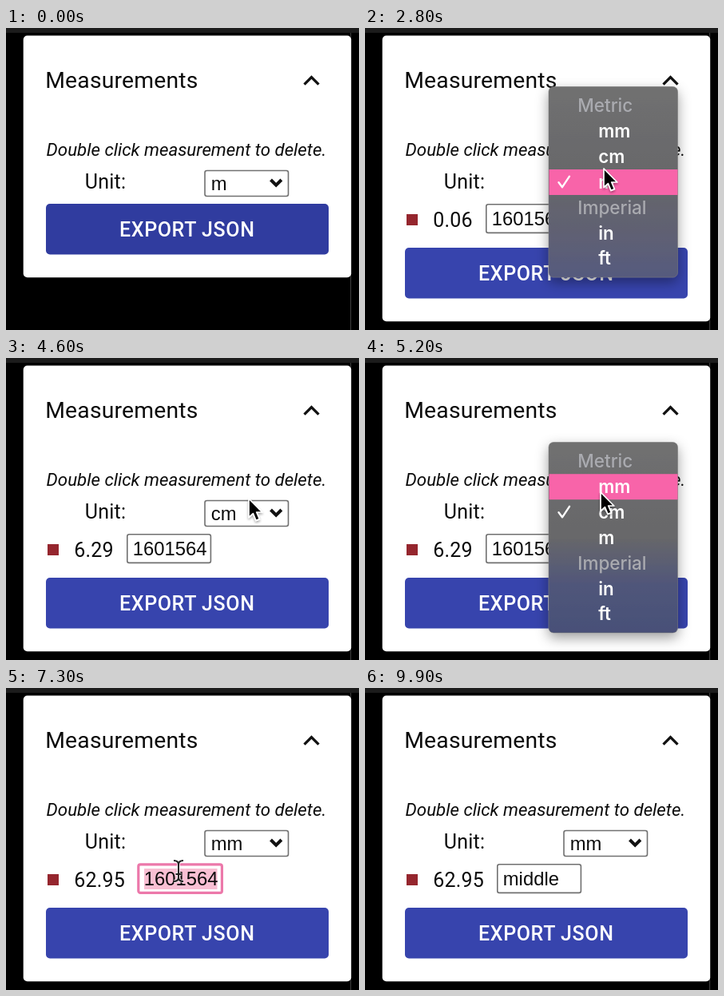
An HTML page for the animation above (10 s loop, 442 by 378 pixels).

```html
<!DOCTYPE html>
<html lang="en">
<head>
<meta charset="utf-8">
<title>Measurements panel</title>
<style>
  html, body { margin: 0; width: 100%; height: 100%; overflow: hidden; background: #000; }
  svg { display: block; width: 442px; height: 378px; }
  text { font-family: Roboto, sans-serif; fill: #0b0b0b; white-space: pre; }
  .title { font-size: 28.3px; letter-spacing: .2px; }
  .hint { font-size: 22.3px; font-style: italic; }
  .body { font-size: 25px; letter-spacing: .22px; }
  .field { font-family: "Liberation Sans", Arial, sans-serif; font-size: 23.8px; }
  .label { font-size: 25px; font-weight: 500; letter-spacing: .6px; fill: #fff; }
  .menu text { font-family: Inter, sans-serif; font-size: 22.3px; font-weight: 600; fill: #fff; }
  .menu .group { font-size: 22.5px; font-weight: 500; fill: #aaabb0; }
  .box { fill: #fff; stroke: #707070; stroke-width: 1.6; }
  .line { fill: none; stroke: #111; }
</style>
</head>
<body>
<svg viewBox="0 0 442 378">
  <defs>
    <linearGradient id="shade" x1="0" y1="0" x2="0" y2="1">
      <stop offset="0" stop-color="#707070"/>
      <stop offset=".5" stop-color="#67676a"/>
      <stop id="mid" offset=".75"/>
      <stop id="low" offset="1"/>
    </linearGradient>
    <filter id="soft" x="-25%" y="-25%" width="150%" height="150%">
      <feDropShadow dx="0" dy="6" stdDeviation="8" flood-opacity=".38"/>
    </filter>
    <filter id="near" x="-50%" y="-50%" width="200%" height="200%">
      <feDropShadow dx="0" dy="2" stdDeviation="1.5" flood-opacity=".35"/>
    </filter>
  </defs>
  <rect width="442" height="378" fill="#000"/>
  <rect width="442" height="6" fill="#1c1c1c"/>
  <rect x="431" y="6" width="1.2" height="372" fill="#3a3a3a"/>
  <rect id="panel" x="21.7" y="9.6" width="410.5" rx="5" fill="#fff"/>
  <text class="title" x="49.2" y="75">Measurements</text>
  <path class="line" d="M373.5 70.6 382.5 61.6 391.5 70.6" stroke-width="3.3"/>
  <text class="hint" x="50.6" y="160">Double click measurement to delete.</text>
  <text class="body" x="98.8" y="201">Unit:</text>
  <rect class="box" x="249" y="178.5" width="104.5" height="32" rx="2.5"/>
  <text class="field" id="unit" x="256.8" y="203"></text>
  <path class="line" d="M331.5 190 338.2 196.7 344.9 190" stroke-width="4"/>

  <g id="row">
    <rect x="52" y="233" width="14" height="14" fill="#95262e"/>
    <text class="body" id="value" x="85.2" y="248.5"></text>
    <g id="input">
      <rect class="box" id="frame" x=".8" y="220.8" width="104.6" height="35.6" rx="2.5"/>
      <rect id="pick" x="8" y="226" width="91.5" height="26" fill="#f9bfd3"/>
      <text class="field" id="name" x="7.8" y="247"></text>
      <rect id="caret" y="227" width="1.6" height="24" fill="#111"/>
    </g>
  </g>
  <g id="button">
    <rect id="face" x="50" y="220" width="354" height="63.5" rx="5"/>
    <text class="label" x="142" y="261">EXPORT JSON</text>
  </g>

  <g id="menu" class="menu">
    <rect x="230" y="73.5" width="161.5" height="238.5" rx="6" fill="url(#shade)"
          stroke="#777" stroke-opacity=".6" filter="url(#soft)"/>
    <rect id="mark" x="230.5" width="161" height="32" fill="#f864a9"/>
    <g id="items"></g>
    <path id="tick" d="M242.5 0 247 6 256-7.5" fill="none" stroke="#fff" stroke-width="2.4"
          stroke-linecap="round" stroke-linejoin="round"/>
  </g>

  <path id="arrow" d="M0 0V23.5L5.4 18.6 9 27.4 13.4 25.6 9.7 17H16.8Z" fill="#000"
        stroke="#fff" stroke-width="1.7" stroke-linejoin="round" filter="url(#near)"/>
  <g id="beam" fill="none">
    <path d="M-6-13Q0-13 0-8Q0-13 6-13M0-9V9M-6 13Q0 13 0 8Q0 13 6 13M-3.5 4H3.5"
          stroke="#fff" stroke-width="4" opacity=".7"/>
    <path d="M-6-13Q0-13 0-8Q0-13 6-13M0-9V9M-6 13Q0 13 0 8Q0 13 6 13M-3.5 4H3.5"
          stroke="#222" stroke-width="2"/>
  </g>
</svg>
<script>
const LOOP = 10000, STEP = 100, PITCH = 31.9;
const $ = id => document.getElementById(id);
const set = (id, attrs) => { for (const k in attrs) $(id).setAttribute(k, attrs[k]); };
const show = (id, on) => { $(id).style.display = on ? '' : 'none'; };
const write = (id, text) => { if ($(id).textContent !== text) $(id).textContent = text; };

const options = ['Metric', 'mm', 'cm', 'm', 'Imperial', 'in', 'ft'];
const rowY = i => 97.5 + i * PITCH;
$('items').innerHTML = options.map((name, i) => {
  const group = i % 4 === 0;
  return `<text x="${group ? 266.3 : 292.2}" y="${rowY(i) + 7.5}"${group ? ' class="group"' : ''}>${name}</text>`;
}).join('');

// time, x, y of the pointer tip
const path = [
  [1500, 175, 165], [1700, 232, 177], [1900, 293, 187], [2100, 302, 190],
  [2500, 302, 187], [2800, 299, 176], [3300, 302, 181], [3800, 303, 177],
  [4000, 307, 160.5], [4300, 306, 160], [4500, 305, 170], [4800, 302, 188],
  [5000, 300, 184], [5200, 295, 168], [5500, 297, 162], [5800, 299, 164],
  [6100, 290, 180], [6300, 248, 208], [6400, 216, 229]
];
// opening, choice, closed, vertical shift, ticked row, highlight changes
const menus = [
  { open: 2100, pick: 4300, end: 4500, dy: 0, tick: 3, marks: [[0, 3], [3900, 2]] },
  { open: 4900, pick: 5600, end: 5800, dy: 32, tick: 2, marks: [[0, 2], [5100, 1]] }
];
const units = [[0, 'm', '0.06'], [4500, 'cm', '6.29'], [5800, 'mm', '62.95']];
const latest = (table, t) => table.filter(r => r[0] <= t).pop();

function pointAt(t) {
  const i = path.findIndex(p => p[0] > t);
  if (i < 0) return path[path.length - 1].slice(1);
  if (i === 0) return path[0].slice(1);
  const [a, b] = [path[i - 1], path[i]], k = (t - a[0]) / (b[0] - a[0]);
  return [a[1] + (b[1] - a[1]) * k, a[2] + (b[2] - a[2]) * k];
}

function drawInput(t, wide) {
  const focus = t >= 6700 && t < 9600, picked = t >= 6900 && t < 7800;
  const typed = 'middle'.slice(0, Math.max(0, Math.floor((t - 8400) / STEP)));
  const text = t < 7800 ? '1601564' : typed;
  write('name', text);
  set('input', { transform: `translate(${wide ? 165 : 151} 0)` });
  $('frame').style.stroke = focus ? '#ec78aa' : '';
  $('frame').style.strokeWidth = focus ? 3.2 : '';
  show('pick', picked);
  show('caret', focus && !picked);
  if (focus) set('caret', { x: 8 + $('name').getComputedTextLength() });
}

function drawMenu(t) {
  const m = menus.find(m => t >= m.open && t < m.end);
  show('menu', m);
  if (!m) return;
  const fade = t < m.pick ? 1 : 1 - (t - m.pick) / (m.end - m.pick);
  set('menu', { transform: `translate(0 ${m.dy})`, opacity: fade });
  set('mark', { y: rowY(latest(m.marks, t)[1]) - 16.2 });
  set('tick', { transform: `translate(0 ${rowY(m.tick)})` });
  set('mid', { 'stop-color': m.dy ? '#50567a' : '#606172' });
  set('low', { 'stop-color': m.dy ? '#485078' : '#565a7e' });
}

function draw(time) {
  const t = Math.floor(time % LOOP / STEP) * STEP;
  const grown = t >= 800, [, unit, value] = latest(units, t);
  set('panel', { height: grown ? 357.6 : 302.6 });
  show('row', grown);
  set('button', { transform: `translate(0 ${grown ? 55 : 0})` });
  const k = Math.min(1, Math.max(0, (t - 800) / 300));
  const mix = (a, b) => Math.round(a + (b - a) * k);
  set('face', { fill: `rgb(${mix(48, 55)},${mix(60, 68)},${mix(159, 173)})` });
  write('unit', unit);
  write('value', value);
  drawInput(t, unit === 'mm');
  drawMenu(t);
  const [x, y] = pointAt(t), at = { transform: `translate(${x} ${y})` };
  show('arrow', t >= 1500 && t < 6400);
  show('beam', t >= 6400 && t < 7800);
  set('arrow', at);
  set('beam', at);
}

const start = performance.now();
function tick() {
  draw(performance.now() - start);
  requestAnimationFrame(tick);
}
tick();
</script>
</body>
</html>
```
